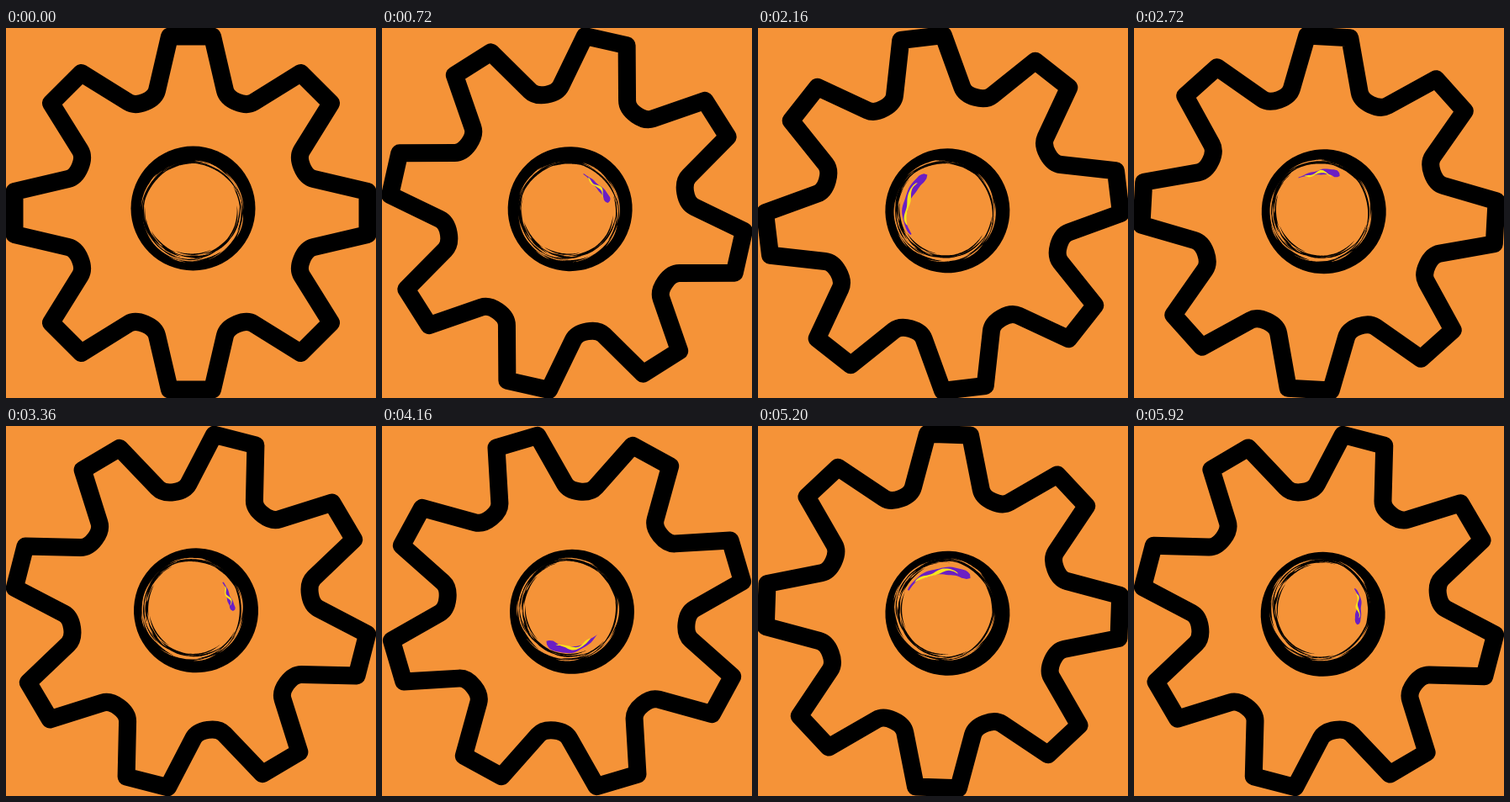
Write an HTML page with a canvas that moves like this. It is 440 px wide and 440 px high and loops after 6000 ms.

```html
<!DOCTYPE html>
<html lang="en">
<head>
<meta charset="utf-8">
<title>Turning gear</title>
<style>
html, body { margin: 0; width: 100%; height: 100%; overflow: hidden; background: #f59338; }
canvas { display: block; width: 440px; height: 440px; }
</style>
</head>
<body>
<canvas id="stage" width="440" height="440"></canvas>
<script>
const ctx = document.getElementById('stage').getContext('2d');
const ORANGE = '#f59338', BLACK = '#000', PURPLE = '#6b1fc4', YELLOW = '#f7e51c', PINK = '#c42fc0';
const LOOP = 6000, STEP = 80, SWEEP = 2880, TURN = 1.414;
const RAD = Math.PI / 180;

// Brush sweep: [time, tail angle, head angle], clockwise from the top
const KEYS = [
  [0, -52, -6], [160, -46, 8], [480, -11, 33], [1280, 57, 141],
  [1360, 81, 173], [2160, 197, 297], [2320, 206, 308], [2880, 308, 354]
];

function random(seed) {
  return () => (seed = (seed * 16807) % 2147483647) / 2147483647;
}

function gearPath() {
  const path = new Path2D();
  for (let i = 0; i < 8; i++) {
    const c = Math.cos(i * 45 * RAD), s = Math.sin(i * 45 * RAD);
    const at = (x, y) => [x * c - y * s, x * s + y * c];
    if (i === 0) path.moveTo(-25.5, -210);
    else path.lineTo(...at(-25.5, -210));
    path.lineTo(...at(25.5, -210));
    path.lineTo(...at(40.4, -146));
    // the valley ends on the left flank of the next tooth
    const n = Math.SQRT1_2;
    const next = (x, y) => at((x - y) * n, (x + y) * n);
    path.bezierCurveTo(...at(43.2, -134), ...next(-43.2, -134), ...next(-40.4, -146));
  }
  path.closePath();
  return path;
}

// Curved band between two angles; mid and half give its radius and half width at u in 0..1
function band(path, a0, a1, mid, half) {
  const n = 28;
  for (let i = 0; i <= 2 * n + 1; i++) {
    const back = i > n;
    const u = (back ? 2 * n + 1 - i : i) / n;
    const r = mid(u) + (back ? -1 : 1) * half(u);
    const a = (a0 + (a1 - a0) * u) * RAD;
    path[i ? 'lineTo' : 'moveTo'](r * Math.sin(a), -r * Math.cos(a));
  }
  path.closePath();
}

function streakPath(seed, count, base, depth, width) {
  const rnd = random(seed), path = new Path2D();
  for (let i = 0; i < count; i++) {
    const a = rnd() * 360, len = 14 + rnd() * 40;
    const heavy = Math.max(0, Math.cos((a + len / 2 - 170) * RAD));
    const r = base - rnd() * (2.5 + depth * heavy);
    const w = width * (0.4 + rnd() * 0.6), drift = (rnd() - 0.5) * 3;
    band(path, a, a + len, u => r + drift * (u - 0.5), u => w * Math.sin(Math.PI * u));
  }
  return path;
}

const gear = gearPath();
const darkStreaks = streakPath(71, 62, 59.5, 7, 1.1);
const lightStreaks = streakPath(29, 22, 61, 3, 0.7);

function fill(path, color) {
  ctx.fillStyle = color;
  ctx.fill(path);
}

function disc(x, y, r, color) {
  ctx.fillStyle = color;
  ctx.beginPath();
  ctx.arc(x, y, r, 0, 2 * Math.PI);
  ctx.fill();
}

function sweepAt(p) {
  const i = KEYS.findIndex(k => k[0] > p);
  const a = KEYS[i - 1], b = KEYS[i];
  const u = (p - a[0]) / (b[0] - a[0]);
  return [a[1] + (b[1] - a[1]) * u, a[2] + (b[2] - a[2]) * u];
}

function drawBrush(p) {
  if (p < STEP) return;
  const [tail, head] = sweepAt(p);
  const len = head - tail, size = Math.min(1, 0.35 + len / 150);
  const wave = p / 300;
  const purple = new Path2D(), yellow = new Path2D(), pink = new Path2D();
  band(purple, tail, head,
    u => 47 + 1.5 * Math.sin(u * 6 + wave),
    u => size * (0.4 + 5.4 * Math.pow(u, 0.8) + 0.5 * Math.sin(u * 19 + wave)) *
      Math.sqrt(Math.min(1, (1 - u) * 9)));
  band(yellow, tail + len * 0.14, tail + len * 0.82,
    u => 45.5 + 2 * Math.sin(u * 8 + wave),
    u => size * (1.7 + 0.6 * Math.sin(u * 13)) * Math.sqrt(Math.sin(Math.PI * u) + 1e-6));
  fill(purple, PURPLE);
  fill(yellow, YELLOW);
  if (p >= 1360 && p < 1600) {
    band(pink, head - 1, head + 9, u => 52 - u, u => 2 * Math.sin(Math.PI * u));
    fill(pink, PINK);
  }
}

function draw(t) {
  const step = Math.floor((t % LOOP) / STEP);
  ctx.setTransform(1, 0, 0, 1, 0, 0);
  ctx.fillStyle = ORANGE;
  ctx.fillRect(0, 0, 440, 440);

  const angle = step * TURN * RAD;
  ctx.translate(220, 220);
  ctx.rotate(angle);
  ctx.lineWidth = 21;
  ctx.lineJoin = 'round';
  ctx.strokeStyle = BLACK;
  ctx.stroke(gear);
  disc(2.5, -5.5, 74, BLACK);

  ctx.setTransform(1, 0, 0, 1, 221.5, 218);
  ctx.rotate(angle);
  disc(0, 0, 59.5, ORANGE);
  fill(darkStreaks, BLACK);
  fill(lightStreaks, ORANGE);
  drawBrush((step * STEP) % SWEEP);
}

const start = performance.now();
function tick() {
  draw(performance.now() - start);
  requestAnimationFrame(tick);
}
tick();
</script>
</body>
</html>
```
